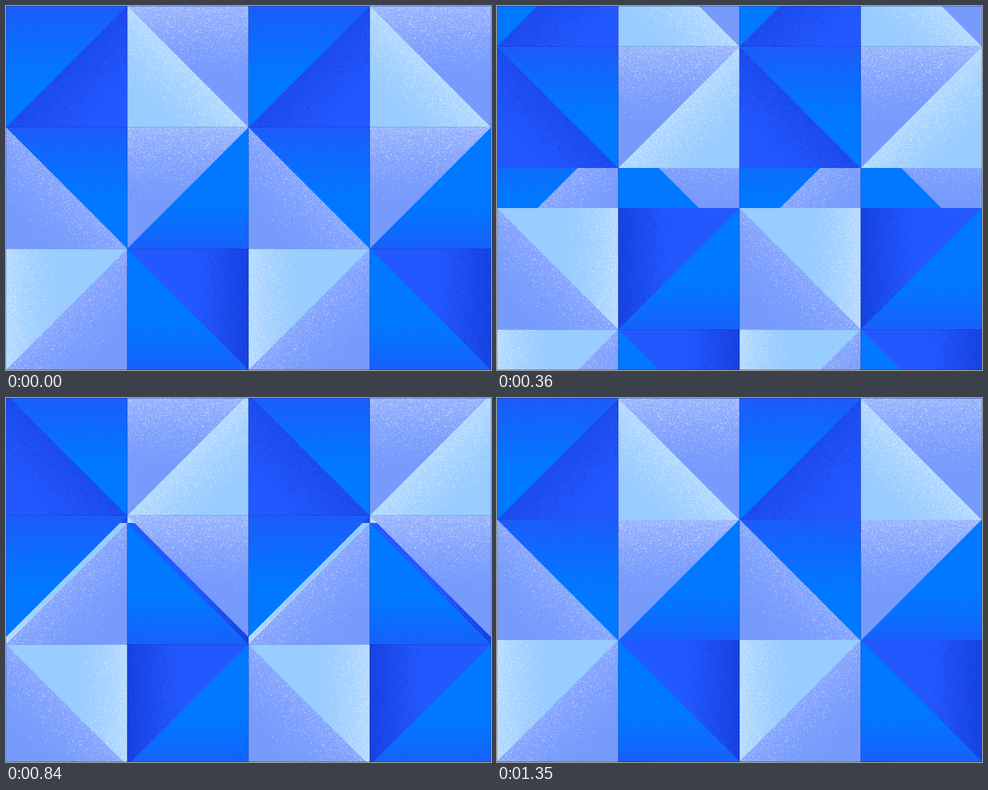
These frames come from a looping animation (800x600 px, 1.38 s). An HTML page with a canvas:

```html
<!DOCTYPE html>
<html lang="en">
<head>
<meta charset="utf-8">
<title>Triangle tiles</title>
<style>
  html, body { margin: 0; width: 100%; height: 100%; overflow: hidden; background: #0078ff; }
  canvas { display: block; width: 800px; height: 600px; }
</style>
</head>
<body>
<canvas id="stage" width="800" height="600"></canvas>
<script>
const SIZE = 200, LOOP = 1380, HALF = 720, MOVE = 690;
const BLUE = [0, 120, 255], ROYAL = [35, 88, 255], NAVY = [14, 52, 206], VIOLET = [38, 82, 248];
const PERI = [119, 155, 253], LIGHT = [153, 204, 255], WHITE = [250, 252, 255];
const ctx = document.getElementById('stage').getContext('2d');

let seed = 7;
function random() {
  seed = (seed + 0x6d2b79f5) | 0;
  let v = Math.imul(seed ^ (seed >>> 15), seed | 1);
  v ^= v + Math.imul(v ^ (v >>> 7), v | 61);
  return ((v ^ (v >>> 14)) >>> 0) / 4294967296;
}

// Distance from the edge where the grain is densest
const edges = {
  top: (x, y) => y,
  left: x => x,
  bottom: (x, y) => SIZE - 1 - y,
  diagonal: (x, y) => Math.abs(x + y - SIZE + 1) / Math.SQRT2
};

function newCanvas() {
  const c = document.createElement('canvas');
  c.width = c.height = SIZE;
  return c;
}

function mirror(image) {
  const c = newCanvas(), g = c.getContext('2d');
  g.translate(SIZE, 0);
  g.scale(-1, 1);
  g.drawImage(image, 0, 0);
  return c;
}

// Grainy triangle in the upper left or lower right half of a tile: [plain, mirrored]
function triangle(upper, base, grain, edge, density, range) {
  const c = newCanvas(), g = c.getContext('2d');
  const image = g.createImageData(SIZE, SIZE);
  for (let y = 0; y < SIZE; y++) {
    for (let x = 0; x < SIZE; x++) {
      const side = x + y - SIZE + 1;
      if (upper ? side > 0 : side < 0) continue;
      const near = Math.max(0, 1 - edges[edge](x, y) / range);
      const shade = density * near ** 1.6;
      // a soft tint with sparse specks on top
      const speck = random() < shade * 0.5 ? 0.2 + 0.6 * random() : 0;
      const mix = Math.max(shade * 0.5, speck);
      const i = (y * SIZE + x) * 4;
      for (let k = 0; k < 3; k++) image.data[i + k] = base[k] + (grain[k] - base[k]) * mix;
      image.data[i + 3] = upper && side === 0 ? 128 : 255;
    }
  }
  g.putImageData(image, 0, 0);
  return [c, mirror(c)];
}

// Each column: a rising tile and a sinking tile, both made of two triangles
const columns = [
  {
    rise: [triangle(true, BLUE, VIOLET, 'top', 1.5, 130),
           triangle(false, ROYAL, NAVY, 'diagonal', 0.6, 115)],
    sink: [triangle(true, LIGHT, WHITE, 'left', 0.55, 90),
           triangle(false, PERI, WHITE, 'diagonal', 0.24, 95)]
  },
  {
    rise: [triangle(true, PERI, WHITE, 'top', 0.5, 120),
           triangle(false, LIGHT, WHITE, 'diagonal', 0.5, 95)],
    sink: [triangle(true, ROYAL, NAVY, 'left', 1.2, 100),
           triangle(false, BLUE, VIOLET, 'bottom', 1.2, 85)]
  }
];

function ease(x) {
  const curve = (a, b, u) => 3 * (1 - u) ** 2 * u * a + 3 * (1 - u) * u * u * b + u ** 3;
  let lo = 0, hi = 1;
  for (let i = 0; i < 30; i++) {
    const mid = (lo + hi) / 2;
    if (curve(0.69, 0.237, mid) < x) lo = mid; else hi = mid;
  }
  return curve(0, 1, lo);
}

function drawColumn(x, { rise, sink }, turn, shift) {
  const put = (part, y, flip) => ctx.drawImage(part[flip], x, y);
  const tile = ([top, bottom], y, flip) => { put(bottom, y, flip); put(top, y, flip); };
  const next = 1 - turn;
  tile([rise[0], sink[1]], SIZE, turn);
  tile(rise, -shift, turn);
  tile(rise, SIZE - shift, next);
  tile(sink, 2 * SIZE + shift, turn);
  tile(sink, SIZE + shift, next);
  put(rise[0], SIZE - shift, next);
}

function drawLines(shift) {
  ctx.fillStyle = 'rgba(0, 25, 110, 0.4)';
  for (let x = 0; x <= 800; x += SIZE) ctx.fillRect(x - 0.5, 0, 1, 600);
  ctx.fillRect(0, 0, 800, 1);
  ctx.fillRect(0, 599, 800, 1);
  ctx.fillStyle = 'rgba(0, 25, 110, 0.22)';
  ctx.fillRect(0, SIZE - shift - 1, 800, 1);
  ctx.fillRect(0, 2 * SIZE + shift, 800, 1);
}

function draw(time) {
  const t = time % LOOP;
  const half = t < HALF ? 0 : 1;
  const shift = Math.round(SIZE * ease(Math.min(1, (t - half * HALF) / MOVE)));
  for (let i = 0; i < 4; i++) {
    const odd = i % 2;
    drawColumn(i * SIZE, columns[odd], half ^ odd, shift);
  }
  drawLines(shift);
}

const start = performance.now();
function frame() {
  draw(performance.now() - start);
  requestAnimationFrame(frame);
}
frame();
</script>
</body>
</html>
```
